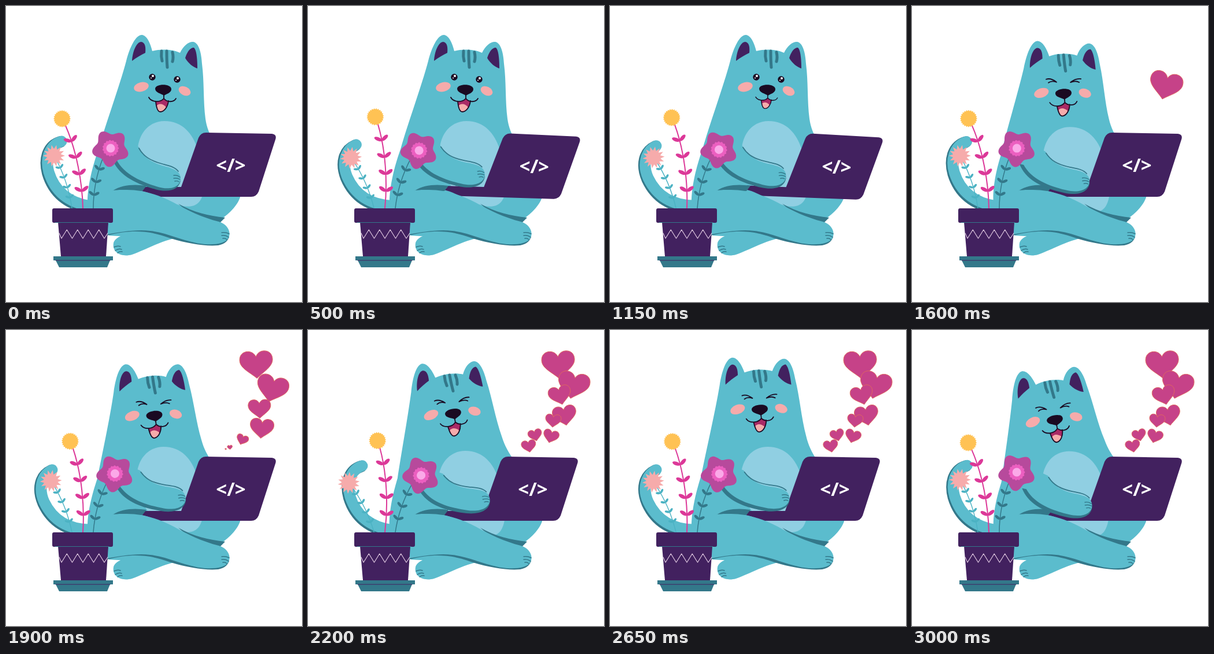
An HTML page for the animation above (3050 ms loop, 512 by 512 pixels).

```html
<!DOCTYPE html>
<html lang="en">
<head>
<meta charset="utf-8">
<title>Cat with laptop</title>
<style>
  html, body { margin: 0; width: 100%; height: 100%; overflow: hidden; background: #fff; }
  svg { display: block; width: 100%; height: 100%; }
  .teal { fill: #5bbccd; }
  .shade { fill: #33788a; }
  .purple { fill: #42215f; }
  .ink { fill: #1a0a22; }
  .blush { fill: #f6abab; }
  .line { fill: none; stroke-linecap: round; stroke-linejoin: round; }
  .dark { stroke: #33788a; }
  .black { stroke: #1a0a22; stroke-width: 1.8; }
  .heart { fill: #c64288; stroke: #e0685f; stroke-width: 1; vector-effect: non-scaling-stroke; }
  text { font: 600 33px "Noto Sans", "Open Sans", sans-serif; fill: #fff; text-anchor: middle; }
</style>
</head>
<body>
<svg viewBox="0 0 512 512">
  <g id="tail" class="line" stroke-width="20">
    <path class="dark" d="M94 235 C74 241 65 262 72 289 C82 323 106 343 145 350"/>
    <path stroke="#5bbccd" stroke-width="19" d="M96 234 C77 240 67 262 74 287 C84 320 108 340 145 346"/>
  </g>

  <path id="body" class="teal"/>
  <path id="belly" fill="#90cfe2" d="M228 246 C231 217 250 199 274 199 C306 199 323 222 331 246 C346 288 347 323 334 339 C322 352 300 349 265 329 C240 310 228 280 228 246Z"/>

  <g id="head">
    <path class="purple" d="M218 95 C219 78 226 62 234 62 C241 63 242 72 241 81 C233 85 226 89 218 95Z"/>
    <path class="purple" d="M310 90 C313 80 318 72 325 72 C330 76 331 95 331 108 C324 106 315 99 310 90Z"/>
    <g class="line dark" stroke-width="5">
      <path d="M269 78 Q268 87 270 95"/>
      <path d="M278 78 Q278 95 279 106"/>
      <path d="M288 80 Q290 89 288 96"/>
    </g>
    <ellipse class="blush" cx="234" cy="140" rx="13" ry="8" transform="rotate(-14 234 140)"/>
    <ellipse class="blush" cx="309" cy="147" rx="11" ry="7.5" transform="rotate(26 309 147)"/>
    <g id="open">
      <circle class="ink" cx="253" cy="123" r="5.7"/>
      <circle class="ink" cx="296" cy="127" r="5.7"/>
      <g fill="#fff">
        <circle cx="254" cy="121" r="2"/><circle cx="251" cy="124.5" r="1"/>
        <circle cx="297" cy="125" r="2"/><circle cx="294" cy="128.5" r="1"/>
      </g>
    </g>
    <g id="shut" class="line black">
      <path transform="translate(253 120) rotate(5)" d="M-9 -2 C-3 -4 4 -1 9 3 C4 1 -1 1 -5 4"/>
      <path transform="translate(295 124) rotate(5)" d="M9 -3 C3 -4 -4 -1 -9 3 C-4 1 1 0 6 3"/>
    </g>
    <g id="mouth">
      <path fill="#a92a66" d="M259 165 C260 176 263 183 267 183 C274 183 280 174 281 164 Q276 164 273 160 Q268 166 259 165Z"/>
      <path class="blush" d="M261 172 C262 179 264 183 267 183 C271 183 275 179 277 175 Q268 166 261 172Z"/>
      <path class="line black" d="M259 165 C260 176 263 183 267 183 C274 183 280 174 281 164 M247 158 C251 166 266 168 273 160 C279 167 290 167 294 160 M273 152 V160"/>
    </g>
    <path class="ink" d="M258 143 C259 134 286 134 286 144 C286 150 278 152 273 155 C268 151 258 150 258 143Z"/>
  </g>

  <path class="shade" d="M298 342 C325 357 350 363 379 366 L370 375 C340 368 315 358 298 342Z"/>

  <g id="laptop">
    <path class="purple" d="M236 313 L303 313 L333 228 Q337 219 346 219 L460 221 Q469 222 466 231 L437 321 Q433 330 424 330 L262 330 Q246 322 234 320 Q228 316 236 313Z"/>
    <text x="389" y="286.5">&lt;/&gt;</text>
  </g>

  <path class="shade" d="M184 320 C200 309 222 308 243 311 L236 320Z"/>
  <g id="arm">
    <path class="shade" d="M183 262 C192 291 222 307 258 317 C280 323 299 319 302 302 L250 280Z"/>
    <path class="teal" d="M186 252 C194 285 225 301 260 312 C284 320 302 313 302 298 C302 286 290 281 270 276 C247 269 236 258 229 243 L205 230Z"/>
    <path class="line dark" stroke-width="1.8" d="M230 246 C237 259 248 267 270 273 C281 276 292 278 298 286"/>
    <path class="line dark" stroke-width="1.4" d="M290 293 Q296 292 301 296 M290 298 Q296 297 301 300 M292 303 Q296 302 299 304"/>
  </g>

  <path class="teal" d="M186 410 C189 399 205 395 225 389 L300 400 C270 405 240 422 218 430 C200 435 183 427 186 410Z"/>
  <path class="line dark" stroke-width="1.5" d="M187 417 Q193 414 198 416 M189 423 Q195 419 200 421 M193 427 Q197 424 201 425"/>
  <path class="shade" d="M174 397 C215 387 245 387 285 402 C315 411 345 416 367 414 C378 412 385 406 386 398 L200 370Z"/>
  <path class="teal" d="M141 343 C150 325 180 317 205 318 C235 317 262 326 290 340 C315 354 340 366 368 373 C383 377 390 391 385 401 C380 411 362 413 344 412 C310 409 280 392 250 389 C225 386 200 391 174 395 L141 390Z"/>
  <path class="line dark" stroke-width="1.5" d="M373 392 Q380 391 386 394 M373 397 Q380 396 385 400 M375 402 Q379 401 382 404"/>

  <g id="small"></g>
  <g id="pink"></g>
  <g id="yellow"></g>

  <path class="shade" d="M82 433 H185 V440 H180 L175 452 H92 L86 440 H82Z"/>
  <path class="line" stroke="#42215f" stroke-width="1" d="M86 440 H180"/>
  <path class="purple" d="M90 374 H177 L173 433 H95Z"/>
  <rect class="purple" x="80" y="350" width="105" height="25" rx="3"/>
  <path class="line" stroke="#33788a" stroke-width="1" d="M85 374.5 H178"/>
  <path id="zigzag" class="line" stroke="#e6cfe6" stroke-width="1.1"/>

  <g id="hearts"></g>
</svg>

<script>
const LOOP = 3050, STEP = 50, LAUGH = 1250;
const $ = id => document.getElementById(id);
const clamp = v => Math.max(0, Math.min(1, v));
const ease = v => { const u = clamp(v); return u * u * (3 - 2 * u); };

// Swings 0-1-0, n times per loop; skew below 1 peaks earlier.
const wave = (t, n, skew = 1) => Math.sin(Math.PI * (t * n / LOOP % 1) ** skew) ** 2;

// Eased path through [time, value] keys.
const track = (...keys) => t => keys.slice(1).reduce(
  (v, [time, value], i) => v + (value - keys[i][1]) * ease((t - keys[i][0]) / (time - keys[i][0])),
  keys[0][1]);

function add(parent, name, attrs) {
  const el = document.createElementNS('http://www.w3.org/2000/svg', name);
  for (const k in attrs) el.setAttribute(k, attrs[k]);
  return parent.appendChild(el);
}

// Closed outline from a radius function of the angle.
function polar(x, y, n, radius) {
  let d = '';
  for (let i = 0; i < n; i++) {
    const a = i / n * 2 * Math.PI, r = radius(a, i);
    d += (i ? 'L' : 'M') + (x + r * Math.cos(a)).toFixed(2) + ' ' + (y + r * Math.sin(a)).toFixed(2);
  }
  return d + 'Z';
}

// Stem with evenly spaced leaf pairs that follow its slope.
function stem(g, color, width, d, pairs, size) {
  const path = add(g, 'path', { class: 'line', stroke: color, 'stroke-width': width, d });
  const length = path.getTotalLength();
  for (let k = 1; k <= pairs; k++) {
    const at = k / (pairs + 1) * length;
    const p = path.getPointAtLength(at), q = path.getPointAtLength(at + 1);
    const tilt = Math.atan2(q.x - p.x, p.y - q.y) * 180 / Math.PI;
    const pair = add(g, 'g', { transform: `translate(${p.x} ${p.y}) rotate(${tilt}) scale(${size})`, fill: color });
    for (const s of [-1, 1]) {
      add(pair, 'ellipse', { cx: 6 * s, cy: -4, rx: 7, ry: 3.2, transform: `rotate(${-34 * s} ${6 * s} -4)` });
    }
  }
}

function buildPlants() {
  const small = $('small'), pink = $('pink'), yellow = $('yellow');

  stem(small, '#4bb2c3', 1.4, 'M114 350 C110 322 100 290 86 264', 4, .6);
  add(small, 'path', { class: 'blush', d: polar(83, 259, 28, (a, i) => i % 2 ? 12 : 19) });

  stem(pink, '#33788a', 1.5, 'M151 350 C151 318 157 290 168 262', 3, .75);
  add(pink, 'path', { fill: '#b74a9c', d: polar(181, 246, 90, a => 28.3 + 4.2 * Math.cos(5 * (a - 1.66))) });
  add(pink, 'path', { fill: '#ec5fc0', d: polar(181, 246, 90, a => 13.5 + .8 * Math.cos(15 * a)) });
  add(pink, 'circle', { fill: '#fba9e8', cx: 181, cy: 246, r: 7.5 });

  stem(yellow, '#dc3898', 2, 'M133 350 C132 305 122 250 103 207', 4, 1);
  add(yellow, 'path', { fill: '#ffc254', d: polar(97, 195, 48, (a, i) => i % 2 ? 13 : 15) });
}

function buildZigzag() {
  let d = 'M92 393';
  for (let k = 0; k < 9; k++) d += ` L${96 + k * 9.25} ${k % 2 ? 387 : 402}`;
  $('zigzag').setAttribute('d', d + ' L176 393');
}

// Resting x, y, half width and tilt of each heart, top to bottom
const hearts = [
  [433, 60, 28.5, -3], [459, 96, 27.5, 12], [436, 113, 19.5, -14], [444, 148, 20.5, -10],
  [424, 157, 13.5, 6], [393, 182, 12, -14], [420, 184, 13.5, 16], [382, 201, 12.5, -10]
];
const HEART = 'M0 .83 C-.4 .45 -1 .18 -1 -.3 C-1 -.65 -.76 -.82 -.5 -.82 C-.25 -.82 -.08 -.68 0 -.48 '
  + 'C.08 -.68 .25 -.82 .5 -.82 C.76 -.82 1 -.65 1 -.3 C1 .18 .4 .45 0 .83Z';

const BODY = 'M208 95 C214 72 224 50 235 50 C244 51 250 65 253 78 C268 74 288 75 301 81 '
  + 'C307 68 317 61 324 62 C334 64 338 82 339 100 C343 130 341 165 345 195 C347 210 352 222 360 235 '
  + 'C385 265 408 300 405 331 C398 350 380 364 366 373 C300 400 220 400 178 397 L141 345 '
  + 'C140 310 152 270 160 248 C172 205 196 140 208 95Z';

const headX = track([LAUGH, 0], [1600, -10], [2200, -21], [2650, -13], [3000, -25]);
const headY = track([LAUGH, 0], [1600, 7], [2200, 0], [2650, -7], [3000, 11]);

const move = (id, value) => $(id).setAttribute('transform', value);

// The torso follows the head less and less towards the hips; its back bulges as it sinks.
function bendBody(dx, dy, turn, drop) {
  const a = turn * Math.PI / 180, c = Math.cos(a), s = Math.sin(a);
  return BODY.replace(/([\d.]+) ([\d.]+)/g, (m, px, py) => {
    const x = px - 272, y = py - 144;
    const w = clamp((330 - py) / 180);
    const bulge = px < 215 ? .55 * drop * Math.sin(Math.PI * clamp((345 - py) / 260)) : 0;
    const nx = +px + w * (x * c - y * s + dx - x) - bulge;
    const ny = +py + w * (x * s + y * c + dy - y);
    return nx.toFixed(2) + ' ' + ny.toFixed(2);
  });
}

// Hearts fly out of the laptop in an arc, one after another.
function drawHearts(t) {
  hearts.forEach(([x, y, size, tilt], i) => {
    const el = $('hearts').children[i];
    const start = 1410 + 200 * Math.sqrt(i), time = 150 + 1.7 * (206 - y);
    const e = ease((t - start) / time), arc = Math.sin(Math.PI * e);
    const px = 380 + (x - 380) * e + 1.2 * size * arc;
    const py = 206 + (y - 206) * e;
    el.style.display = t > start ? '' : 'none';
    el.setAttribute('transform',
      `translate(${px} ${py}) rotate(${tilt + 17 * arc}) scale(${size * Math.min(1, .1 + 2 * e)})`);
  });
}

function draw(t) {
  const laughing = t >= LAUGH;
  const lean = ease((t - LAUGH) / 300);
  const dx = headX(t), dy = headY(t), turn = dx / 2;
  const bounce = wave(t, 4), sway = wave(t, 2);
  const drop = lean * (11 - 8 * bounce);
  const talk = 1 - .2 * clamp(1 - Math.abs(t - 1150) / 200);

  $('body').setAttribute('d', bendBody(dx, dy, turn, drop));
  move('head', `translate(${dx} ${dy}) rotate(${turn} 272 144)`);
  move('belly', `translate(${dx * .1} ${drop})`);
  move('mouth', `translate(272 155) scale(${talk}) translate(-272 -155)`);
  move('arm', `translate(${2 * sway - .3 * dx} ${drop}) rotate(${-3.5 * lean - 6 * sway} 200 265)`);
  move('laptop', `rotate(${2.2 * bounce * (1 - lean)} 300 355)`);
  move('tail', `rotate(${-8.6 * bounce} 140 345)`);
  move('yellow', `rotate(${8.5 * wave(t, 2, .9)} 133 350)`);
  move('pink', `rotate(${8.5 * sway} 151 350)`);
  move('small', `rotate(${-9 * wave(t, 2, 1.1)} 114 348)`);
  $('open').style.display = laughing ? 'none' : '';
  $('shut').style.display = laughing ? '' : 'none';
  drawHearts(t);
}

buildPlants();
buildZigzag();
hearts.forEach(() => add($('hearts'), 'path', { class: 'heart', d: HEART }));

function tick() {
  const t = performance.now() % LOOP;
  draw(Math.floor(t / STEP) * STEP);
  requestAnimationFrame(tick);
}
tick();
</script>
</body>
</html>
```
